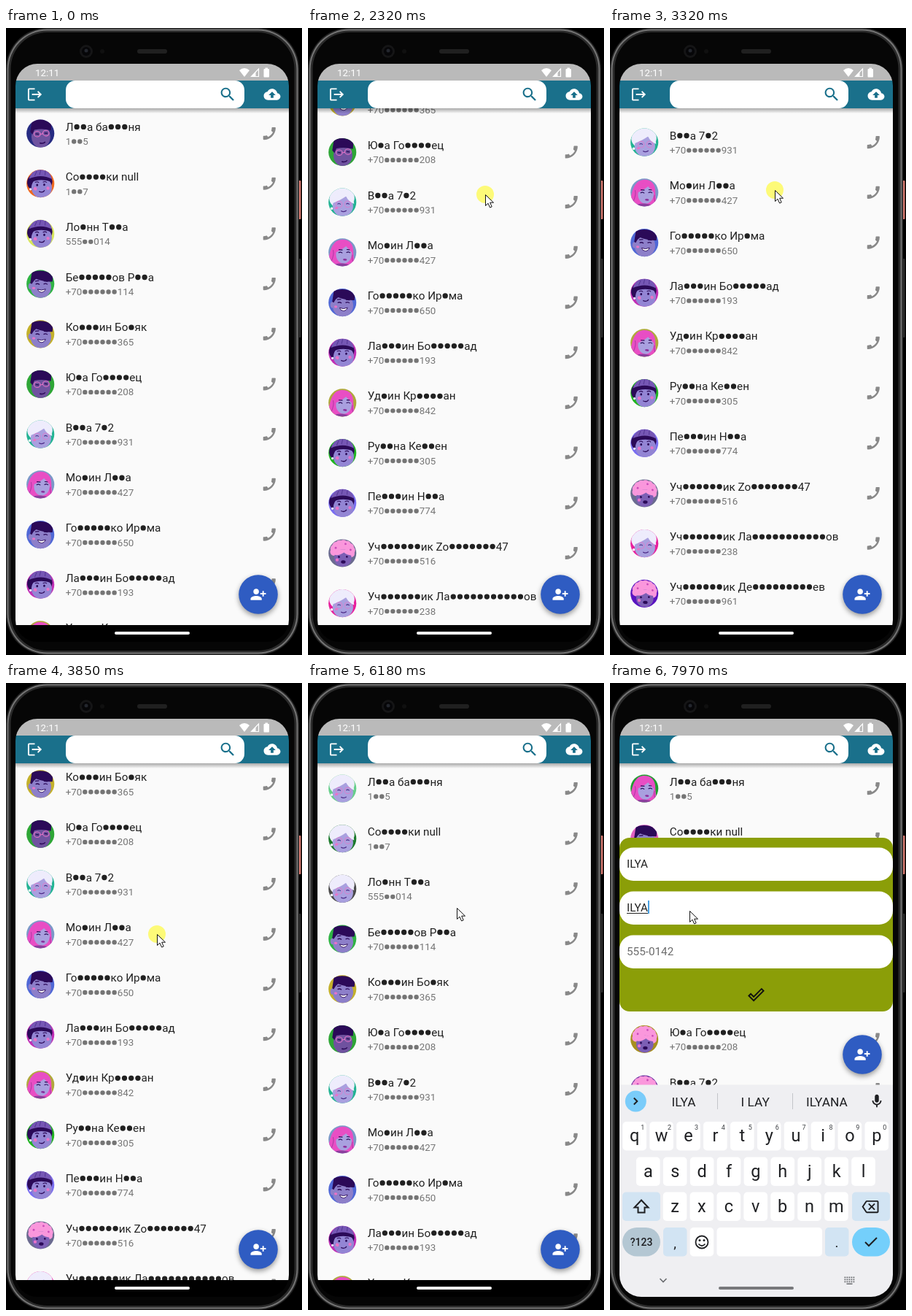
An HTML page with a canvas that plays this animation: 406x859 px, repeating every 8000 ms.

```html
<!DOCTYPE html>
<html lang="ru">
<head>
<meta charset="utf-8">
<title>Contacts</title>
<style>
html, body { margin: 0; height: 100%; overflow: hidden; background: #000; }
canvas { display: block; width: 406px; height: 859px; }
</style>
</head>
<body>
<canvas id="stage"></canvas>
<script>
const canvas = document.getElementById('stage');
const c = canvas.getContext('2d');
const dpr = window.devicePixelRatio || 1;
canvas.width = 406 * dpr;
canvas.height = 859 * dpr;

const TICK = 66.42, LOOP = 8000;
const S = 0.954;             // dp to px
const ROW = 72 * S, TOP = 110, BOTTOM = 818;
const NAME = 'ILYA';

const ICON = {
  logout: 'M17 7l-1.41 1.41L18.17 11H8v2h10.17l-2.58 2.58L17 17l5-5zM4 5h8V3H4c-1.1 0-2 .9-2 2v14c0 1.1.9 2 2 2h8v-2H4V5z',
  search: 'M15.5 14h-.79l-.28-.27C15.41 12.59 16 11.11 16 9.5 16 5.91 13.09 3 9.5 3S3 5.91 3 9.5 5.91 16 9.5 16c1.61 0 3.09-.59 4.23-1.57l.27.28v.79l5 4.99L20.49 19l-4.99-5zm-6 0C7.01 14 5 11.99 5 9.5S7.01 5 9.5 5 14 7.01 14 9.5 11.99 14 9.5 14z',
  backup: 'M19.35 10.04C18.67 6.59 15.64 4 12 4 9.11 4 6.6 5.64 5.35 8.04 2.34 8.36 0 10.91 0 14c0 3.31 2.69 6 6 6h13c2.76 0 5-2.24 5-5 0-2.64-2.05-4.78-4.65-4.96zM14 13v4h-4v-4H7l5-5 5 5h-3z',
  call: 'M20.01 15.38c-1.23 0-2.42-.2-3.53-.56-.35-.12-.74-.03-1.01.24l-1.57 1.97c-2.83-1.35-5.48-3.9-6.89-6.83l1.95-1.66c.27-.28.35-.67.24-1.02-.37-1.11-.56-2.3-.56-3.53 0-.54-.45-.99-.99-.99H4.19C3.65 3 3 3.24 3 3.99 3 13.28 10.73 21 20.01 21c.71 0 .99-.63.99-1.18v-3.45c0-.54-.45-.99-.99-.99z',
  add: 'M13 8c0-2.21-1.79-4-4-4S5 5.79 5 8s1.79 4 4 4 4-1.79 4-4zm2 2v2h3v3h2v-3h3v-2h-3V7h-2v3h-3zM1 18v2h16v-2c0-2.66-5.33-4-8-4s-8 1.34-8 4z',
  done: 'M19.77 5.03l1.4 1.4L8.43 19.17l-5.6-5.6 1.4-1.4 4.2 4.2L19.77 5.03m0-2.83L8.43 13.54l-4.2-4.2L0 13.57l8.43 8.43L24 6.43 19.77 2.2z',
  mic: 'M12 14c1.66 0 3-1.34 3-3V5c0-1.66-1.34-3-3-3S9 3.34 9 5v6c0 1.66 1.34 3 3 3zm5-3c0 2.76-2.24 5-5 5s-5-2.24-5-5H5c0 3.53 2.61 6.43 6 6.92V21h2v-3.08c3.39-.49 6-3.39 6-6.92h-2z',
  erase: 'M22 3H7c-.69 0-1.23.35-1.59.88L0 12l5.41 8.11c.36.53.9.89 1.59.89h15c1.1 0 2-.9 2-2V5c0-1.1-.9-2-2-2zm0 16H7.07L2.4 12l4.66-7H22v14zm-11.59-2L14 13.41 17.59 17 19 15.59 15.41 12 19 8.41 17.59 7 14 10.59 10.41 7 9 8.41 12.59 12 9 15.59z'
};

// name, number, face, background
const CONTACTS = [
  ['Л●●а ба●●●ня', '1●●5', 'shades', '#262b82'],
  ['Со●●●●ки null', '1●●7', 'beanie', '#f0691f'],
  ['Ло●нн Т●●а', '555●●014', 'beanie', '#d8e65c'],
  ['Бе●●●●●ов Р●●а', '+70●●●●●●114', 'grin', '#2fb344'],
  ['Ко●●●ин Бо●як', '+70●●●●●●365', 'grin', '#c3b02b'],
  ['Ю●а Го●●●●ец', '+70●●●●●●208', 'shades', '#2ea636'],
  ['В●●а 7●2', '+70●●●●●●931', 'granny', '#22b393'],
  ['Мо●ин Л●●а', '+70●●●●●●427', 'pink', '#7b98c8'],
  ['Го●●●●●ко Ир●ма', '+70●●●●●●650', 'grin', '#5068d6'],
  ['Ла●●●ин Бо●●●●●ад', '+70●●●●●●193', 'beanie', '#c12fb5'],
  ['Уд●ин Кр●●●●ан', '+70●●●●●●842', 'pink', '#b0a83c'],
  ['Ру●●на Ке●●ен', '+70●●●●●●305', 'beanie', '#22b522'],
  ['Пе●●●ин Н●●а', '+70●●●●●●774', 'beanie', '#7a6ef0'],
  ['Уч●●●●●●ик Zo●●●●●●●47', '+70●●●●●●516', 'afro', '#6b6b90'],
  ['Уч●●●●●●ик Ла●●●●●●●●●●●ов', '+70●●●●●●238', 'granny', '#e81f9c'],
  ['Уч●●●●●●ик Де●●●●●●●●●ев', '+70●●●●●●961', 'afro', '#5a14c0'],
  ['Уч●●●●●●ик Ка●●●●●●ин', '+70●●●●●●480', 'grin', '#2f9fb4']
];
// faces picked again when rows are rebuilt
const REBUILT = { 0: ['granny', '#66cf8a'], 1: ['granny', '#1c7a2c'], 2: ['granny', '#4a4a4a'] };
const EDITING = { 0: ['pink', '#1f9e2f'], 1: ['grin', '#e05fc0'], 5: ['afro', '#a88f1f'], 6: ['afro', '#6a2fa0'] };

// tick, values...
const POINTER = [[9, 352, 795], [20, 251, 610], [26, 251, 610], [28, 250, 572], [35, 243, 228],
  [37, 238, 150], [39, 236, 130], [46, 236, 130], [50, 226, 222], [58, 207, 344], [65, 215, 577],
  [71, 222, 784], [73, 222, 784], [85, 223, 363], [88, 215, 343], [91, 215, 343], [93, 204, 308],
  [99, 152, 268], [103, 152, 268], [108, 110, 375], [114, 110, 375], [118, 109, 312]];
const SCROLL = [[28, 0], [29, 20], [35, 318], [37, 395], [38, 436], [39, 464], [40, 478], [46, 478],
  [47, 470], [50, 400], [58, 281], [65, 64], [67, 0]];
const KEYBOARD = [[110, 0], [114, 267]];
const PRESSES = [[28, 36], [46, 70], [102, 102], [109, 109], [118, 118]];

function at(keys, k) {
  const i = keys.findIndex(p => p[0] > k);
  if (i === 0) return keys[0].slice(1);
  if (i < 0) return keys[keys.length - 1].slice(1);
  const a = keys[i - 1], b = keys[i], f = (k - a[0]) / (b[0] - a[0]);
  return a.slice(1).map((v, j) => v + (b[j + 1] - v) * f);
}

function box(x, y, w, h, fill, r = 0) {
  c.beginPath();
  c.roundRect(x, y, w, h, r);
  c.fillStyle = fill;
  c.fill();
}
function oval(fill, x, y, rx, ry = rx, turn = 0) {
  c.beginPath();
  c.ellipse(x, y, rx, ry, turn, 0, 7);
  c.fillStyle = fill;
  c.fill();
}
function line(d, color, width, x = 0, y = 0) {
  c.save();
  c.translate(x, y);
  c.strokeStyle = color;
  c.lineWidth = width;
  c.stroke(new Path2D(d));
  c.restore();
}
function shape(d, fill, x = 0, y = 0) {
  c.save();
  c.translate(x, y);
  c.fillStyle = fill;
  c.fill(new Path2D(d));
  c.restore();
}
function icon(name, x, y, fill, size = 24 * S, flip = 1) {
  c.save();
  c.translate(x, y);
  c.scale(flip * size / 24, size / 24);
  shape(ICON[name], fill, -12, -12);
  c.restore();
}
function text(str, x, y, size, fill, align = 'left', weight = 400) {
  c.font = `${weight} ${size}px Roboto, sans-serif`;
  c.textAlign = align;
  c.fillStyle = fill;
  c.fillText(str, x, y);
  return c.measureText(str).width;
}
// masked letters are round dots of fixed advance
function masked(str, x, y, size, fill) {
  for (const part of str.match(/●|[^●]+/g)) {
    if (part === '●') {
      oval(fill, x + size * .302, y - size * .34, size * .24);
      x += size * .604;
    } else x += text(part, x, y, size, fill);
  }
}

function eyes(color) {
  oval(color, -4, 2, 1.3, 1.5);
  oval(color, 5, 1, 1.3, 1.5);
  line('M-7 -1q3 -2 5 0M3 -2q3 -2 5 0', color, 1);
}
const DARK = '#2b0a58', ROSE = '#e873c8';
const FACES = {
  shades() {
    oval('#6f529f', 1, 4, 12, 14);
    shape('M-13 -1L-12 -15Q0 -21 13 -14L13 -5Q2 -7 -8 -4L-10 2Z', DARK);
    line('M-8 1a4 3.5 0 1 0 8 0a4 3.5 0 1 0 -8 0M3 -1a4 3.5 0 1 0 8 0a4 3.5 0 1 0 -8 0M0 1L3 0', ROSE, 1);
    line('M-6 1h4M5 -1h4M0 12q5 1 7 -2', DARK, 1.4);
  },
  grin() {
    oval('#8d7fc9', 1, 4, 13, 14);
    oval('#8d7fc9', -12, 4, 3, 4);
    shape('M-13 0L-12 -14Q1 -20 15 -13L15 -4Q5 -3 -6 -6Q-9 -4 -11 1Z', DARK);
    line('M-6 1q2 -2 5 0M4 0q3 -2 5 0M-7 -3l5 -1M4 -4l5 0', DARK, 1.2);
    shape('M-3 7Q2 9 7 6Q6 10 2 10.5Q-2 10.5 -3 7Z', '#fff');
    line('M-3 7Q2 9 7 6Q6 10 2 10.5Q-2 10.5 -3 7Z', DARK, .8);
    oval(ROSE, -8, 6, 2, 1.5);
  },
  beanie() {
    oval(DARK, -1, -2, 16, 13, -.2);
    oval('#9385d4', 2, 5, 13, 13);
    shape('M-14 0Q0 -8 15 -3L13 -7Q0 -12 -14 -4Z', DARK);
    shape('M-15 -5Q-12 -18 1 -18Q12 -17 14 -7Q0 -13 -15 -5Z', '#7657b5');
    line('M-8 -9l2 -6M-2 -11l1 -6M5 -11l0 -6', '#553894', 1);
    eyes(DARK);
    oval(ROSE, -6, 7, 2.2);
    oval(ROSE, 10, 5, 2);
    line('M-1 10q5 2 7 -2', DARK, 1.2);
    oval('#eceaff', -12, 8, 1.5);
  },
  granny() {
    oval('#eeecfc', -1, -5, 16, 13, -.2);
    oval('#a9a0df', 1, 5, 13, 13);
    shape('M-14 3Q-13 -12 1 -14Q13 -12 15 1Q7 -2 4 -8Q-3 -2 -14 3Z', '#eeecfc');
    line('M-8 3a4 4 0 1 0 8 0a4 4 0 1 0 -8 0M3 2a4 4 0 1 0 8 0a4 4 0 1 0 -8 0', '#d97fcd', .9);
    line('M-6 3q2 -2 4 0M5 2q2 -2 4 0M-1 11q4 2 7 -1', '#4b2a86', 1.1);
    oval(ROSE, -7, 8, 2, 1.4);
    oval('#fff', -13, 9, 1.6);
  },
  pink() {
    shape('M-17 17Q-17 -14 -3 -16Q13 -18 14 0Q15 8 18 17Z', '#e84ec4');
    oval('#a9a0df', 2, 2, 10, 12);
    shape('M-9 1Q-8 -13 3 -13Q12 -12 13 0Q9 -3 4 -8Q-1 -3 -9 1Z', '#e84ec4');
    oval('#8b3f9e', 2, 20, 14, 6);
    line('M-5 1q3 -2 5 0M5 0q3 -2 5 0M-5 -3l5 0M5 -4l4 0', DARK, 1.1);
    oval('#8b2f9e', 4, 9, 2.5, 1.3);
    line('M-13 12q3 -8 1 -14M15 12q-3 -6 -2 -10', '#b03aa4', 1);
  },
  afro() {
    for (let i = 0; i < 9; i++) {
      const a = 2.9 + i * .46;
      oval('#fa97dc', 11 * Math.cos(a), -3 + 9 * Math.sin(a), 5);
    }
    oval('#fa97dc', 0, -6, 12, 8);
    oval('#7c5fb5', 1, 6, 11, 11);
    shape('M-10 3Q-8 -5 1 -5Q10 -5 12 2Q5 2 2 -1Q-4 4 -10 3Z', '#fa97dc');
    oval(DARK, -4, 5, 1.3);
    oval(DARK, 6, 4, 1.3);
    oval(ROSE, -6, 9, 2);
    oval(DARK, 2, 11, 3, 2);
    for (const [x, y] of [[-9, -6], [3, -12], [10, -5]]) oval('#c94bb8', x, y, 1.3);
  }
};
function avatar(face, bg, x, y) {
  c.save();
  c.translate(x, y);
  oval(bg, 0, 0, 20 * S);
  c.clip();
  c.rotate(.08);
  c.scale(1.08, 1.08);
  FACES[face]();
  c.restore();
}

function list(k, scroll, bottom) {
  c.save();
  c.beginPath();
  c.rect(13, TOP, 375, bottom - TOP);
  c.clip();
  box(13, TOP, 375, bottom - TOP, '#fafafa');
  CONTACTS.forEach(([name, number, face, bg], i) => {
    const y = TOP + .2 + i * ROW - scroll;
    if (y < TOP - ROW || y > bottom) return;
    if (k >= 40 && REBUILT[i]) [face, bg] = REBUILT[i];
    if (k >= 103 && EDITING[i]) [face, bg] = EDITING[i];
    avatar(face, bg, 47.2, y + ROW / 2);
    masked(name, 81.7, y + 30.4, 16 * S, '#212121');
    masked(number, 81.7, y + 49.8, 14 * S, '#757575');
    icon('call', 361.3, y + ROW / 2, '#898989', 24 * S, -1);
  });
  const shade = c.createLinearGradient(0, TOP, 0, TOP + 7);
  shade.addColorStop(0, 'rgba(0,0,0,.32)');
  shade.addColorStop(1, 'rgba(0,0,0,0)');
  box(13, TOP, 375, 7, shade);
  c.restore();
}

function addButton(y) {
  c.save();
  c.shadowColor = 'rgba(0,0,0,.4)';
  c.shadowBlur = 7 * dpr;
  c.shadowOffsetY = 3 * dpr;
  oval('#2f5cc2', 346, y, 26.8);
  c.restore();
  icon('add', 346, y, '#fff');
}

function form(k, mid) {
  const y = mid - 119;
  const first = NAME.slice(0, Math.max(0, k - 114));
  const second = NAME.slice(0, Math.max(0, (k - 118) * 2));
  const values = [first, second, '555-0142'];
  const focus = k < 110 ? -1 : k < 119 ? 0 : 1;
  box(13, y, 375, 238, '#8b9e08', 14);
  values.forEach((value, i) => {
    const top = y + 13.5 + i * 60;
    box(13, top, 375, 45.5, '#fff', 19);
    const w = text(value, 23, top + 27.5, 16 * S, i < 2 ? '#212121' : '#6b6b6b');
    if (i !== focus) return;
    if (value) box(23, top + 29.5, w, 1, '#212121');
    box(23 + w, top + 12.5, 1.9, 18, '#3d9be0');
  });
  icon('done', 200.5, y + 215, '#111');
}

function key(x, y, w, fill, r = 5) {
  box(x, y, w, 39.5, fill, r);
}
function keyboard(top, typed) {
  c.save();
  c.translate(0, top - 551);
  const ink = '#1f2023', tint = '#d2e4f3';
  box(13, 550.5, 375, 300, '#efeff2');
  oval('#7accfa', 35.3, 573, 14.5);
  line('M-2.5 -4.5L2 0L-2.5 4.5', ink, 2, 35.3, 573);
  icon('mic', 366, 573, ink, 22);
  if (typed) {
    [NAME, 'I LAY', 'ILYANA'].forEach((word, i) => text(word, 101 + i * 98.2, 579.5, 17.3, ink, 'center'));
    box(147, 562, 1, 22, '#c3c5c9');
    box(250, 562, 1, 22, '#c3c5c9');
  }
  [['qwertyuiop', 33.7, 601], ['asdfghjkl', 52.3, 649.5], ['zxcvbnm', 89, 697.5]].forEach(([letters, x0, y], row) => {
    [...letters].forEach((ch, i) => {
      const x = x0 + i * 36.9;
      key(x - 16.3, y, 32.6, '#fff');
      text(ch, x, y + 27, 23.5, ink, 'center');
      if (!row) text((i + 1) % 10, x + 11, y + 11, 9, '#3c3f43', 'center');
    });
  });
  key(17, 697.5, 52, tint);
  line('M0 -9L9.5 1H4.5V8H-4.5V1H-9.5Z', ink, 2, 43, 717.5);
  key(332, 697.5, 52, tint);
  icon('erase', 357, 717.5, ink, 23);
  key(17, 746, 52, '#b4c7d3', 20);
  text('?123', 43, 771, 14, ink, 'center', 500);
  key(73, 746, 32.5, tint);
  text(',', 89, 774, 19, ink, 'center');
  key(109.7, 746, 32.5, '#fff');
  line('M-8.5 0a8.5 8.5 0 1 0 17 0a8.5 8.5 0 1 0 -17 0M-4.5 2.5q4.5 5 9 0', ink, 1.8, 126, 766);
  oval(ink, 123, 763.5, 1.5);
  oval(ink, 129, 763.5, 1.5);
  key(146.5, 746, 144.5, '#fff');
  key(295, 746, 32.5, tint);
  text('.', 311, 773, 19, ink, 'center');
  key(332, 746, 52, '#74cffb', 20);
  line('M-8 0L-3 5L8 -6', ink, 2, 358, 766);
  line('M-4.5 -2L0 2.5L4.5 -2', '#6a6c70', 1.6, 73, 818);
  for (let i = 0; i < 15; i++) box(321.5 + i % 5 * 3, 813.5 + (i / 5 | 0) * 3, 1.8, 1.8, '#6a6c70');
  box(324.5, 822.5, 8, 1.6, '#6a6c70');
  box(149, 827, 103, 4, '#77787b', 2);
  c.restore();
}

function phone() {
  box(0, 0, 406, 859, '#000');
  box(401, 209, 3.5, 53, '#d6786f', 1);
  box(401, 316, 3.5, 108, '#2a2a2a', 1);
  box(0, 0, 402, 859, '#242424', 56);
  box(1.5, 1.5, 399, 856, '#747474', 55);
  box(3.5, 3.5, 395, 852, '#2b2b2b', 53);
  box(6.5, 6, 389, 847, '#060606', 50);
  oval('#151516', 110, 32, 9);
  oval('#060608', 110, 32, 6);
  oval('#23262d', 110, 31, 2.5);
  oval('#101010', 132, 32, 3);
  box(180, 29, 41, 6, '#202020', 3);
}

function bars() {
  box(13, 49, 375, 23, '#bababa');
  text('12:11', 40, 66, 13.3, '#fff');
  shape('M320 58Q327 52 334 58L327 67Z', '#fff');
  line('M336.5 66.5H346.5V56Z', '#fff', 1.2);
  shape('M336 67H342.5V60Z', '#fff');
  box(353.5, 56, 7.5, 11.5, '#fff', 1);
  box(355.5, 54.5, 3.5, 2, '#fff');
  box(13, 72, 375, 38, '#1a708b');
  box(82, 72, 245, 38, '#fff', 13);
  icon('logout', 39.5, 91, '#fff');
  icon('search', 304, 91, '#1a708b', 25);
  icon('backup', 365, 91, '#fff');
}

function pointer(k) {
  if (k < 9) return;
  const [x, y] = at(POINTER, k);
  if (PRESSES.some(([a, b]) => k >= a && k <= b)) oval('rgba(255,250,50,.65)', x, y, 12);
  const arrow = 'M.5 .5V15.5L4 12.2L6.6 18L9.2 16.9L6.7 11.2H11.5Z';
  shape(arrow, '#fff', x, y);
  line(arrow, '#111', 1, x, y);
}

function draw(now) {
  const k = Math.floor((now % LOOP + 8) / TICK);
  const [scroll] = at(SCROLL, k);
  const [rise] = at(KEYBOARD, k);
  const bottom = BOTTOM - rise;
  c.setTransform(dpr, 0, 0, dpr, 0, 0);
  phone();
  c.save();
  c.beginPath();
  c.roundRect(13, 49, 375, 792, 30);
  c.clip();
  box(13, 49, 375, 792, '#000');
  list(k, scroll, bottom);
  bars();
  if (k >= 103) form(k, (TOP + bottom) / 2 + .5);
  addButton(bottom - 42);
  if (rise) keyboard(bottom, k >= 115);
  else box(149, 827, 103, 4, '#fff', 2);
  c.restore();
  pointer(k);
}

const start = performance.now();
function loop() {
  draw(performance.now() - start);
  requestAnimationFrame(loop);
}
loop();
</script>
</body>
</html>
```
